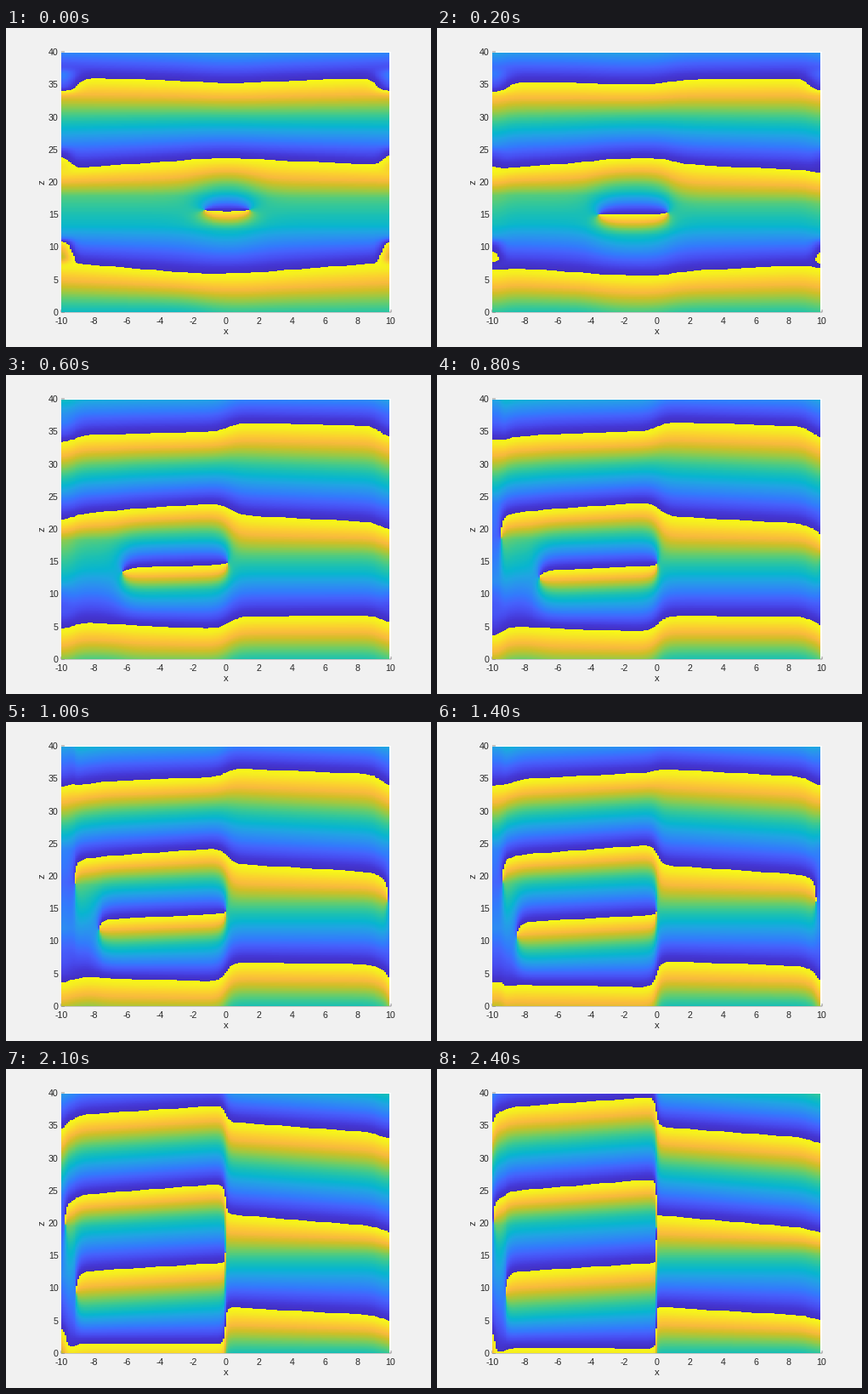
These frames come from a looping animation (500 by 375 pixels, 2.5 s). A matplotlib script:

```python
import numpy as np
import matplotlib.pyplot as plt
from matplotlib.animation import FuncAnimation
from matplotlib.colors import LinearSegmentedColormap

plt.rcParams["font.family"] = "Liberation Sans"
PX = 0.72  # points per pixel at 100 dpi
FRAMES, STEP = 25, 100
INK = "#262626"

PARULA = ("#4230bf #4537d5 #484df0 #4563fd #327cfc #2b91ef #20a5e3 #08b5d0 "
          "#19bfb6 #37c897 #64cd6f #9dc943 #d1bf27 #f8ba3d #fccf30 #f5e924 "
          "#f9fb15").split()
cmap = LinearSegmentedColormap.from_list("parula", PARULA, N=256)

x = -10 + .1 * np.arange(199)
z = .05 + .1 * np.arange(399)[:, None]
side = 10 - np.abs(x)


def wave(points, pivot):
    """Unit wave through (cycles, height, slope along x) points."""
    c, h, _ = points[0]
    c2, h2, s2 = points[-1]
    points = [(c - 1.5, h - 19.8, 0), (c - .5, h - 6.8, 0), *points,
              (c2 + 1, h2 + 13.5, s2)]
    total = points[0][0]
    for (p, a, sa), (q, b, sb) in zip(points, points[1:]):
        low, high = a + sa * (x - pivot), b + sb * (x - pivot)
        total = total + (q - p) * np.clip((z - low) / (high - low), 0, 1)
    return np.exp(2j * np.pi * total)


def outer_wave(t, tilt):
    """Left of the travelling defect: one cycle fewer than inside."""
    s1, s2, s3, s4 = tilt
    return wave([(1, 7.2 - 2.75 * t, s1),
                 (1.45, 13.3 + 1.2 * t, 0),
                 (1.6, 17.8 + .8 * t, 0),
                 (2, 22.4 + .38 * t ** 2, s3),
                 (3, 36 - 3.6 * t + 1.85 * t ** 2, s4)], -8)


def inner_wave(t, tilt):
    """Between the defects; the extra cycle relaxes from a steep step."""
    s1, s2, s3, s4 = tilt
    mid = 13.7 + 1.8 * np.exp(-1.5 * t)
    gap = 3 + 1.5 * t
    return wave([(1, 6 - 2.2 * t, s1),
                 (1.5, mid - gap, s2),
                 (2, mid, s2),
                 (2.5, mid + 1.1 * gap, s2),
                 (3, 23.7 + .5 * t ** 2, s3),
                 (4, 35.2 - 1.2 * t + 1.2 * t ** 2, s4)], -1)


def right_wave(t):
    d = np.exp(-t)
    return wave([(1, 6.8 - .6 * d ** 2, .36 * d - .18),
                 (1.45, 13.4 - .15 * t, 0),
                 (1.6, 15.2 + 2.3 * d ** 2, 0),
                 (2, 22.2 - .6 * t + 1.2 * d ** 4, -.1 - .05 * t),
                 (3, 35.4 + 2 * t - t ** 2, .31 * d - .22)], 2)


def blend(a, b, at, width):
    s = .5 + .5 * np.tanh((x - at) / width)
    return a * (1 - s) + b * s


def wall_shift(t):
    """Phase offset close to both side walls, in cycles."""
    shift = .22 * t * np.exp(-t) * np.exp(-(side / .9) ** 2)
    for height, amount, reach in ((9.4, -.35, .6), (23.5, -.12, .6),
                                  (35.5, .25, .9)):
        spot = np.exp(-((z - height) / 1.8) ** 4 - (side / reach) ** 2)
        shift = shift + amount * np.exp(-3 * t) * spot
    return shift


wall = np.exp(2j * np.pi * np.interp(z, [0, 4.8, 12, 19, 24, 35, 40],
                                     [.65, 1, 1.22, 1.12, 1.2, 2, 2.3]))


def phase(t):
    d = np.exp(-t)
    tilt = np.array([-.2 * d, .18 - .18 * d, .16 + .02 * t, .2 - .28 * d])

    enter = -9.2 - 8 * max(1 - t, 0) ** 2 - .55 * max(t - 1, 0)
    psi = blend(wall, outer_wave(t, tilt), enter, .25)
    psi = blend(psi, inner_wave(t, tilt * np.tanh(3 * t)),
                -9.4 + 8 * np.exp(-1.6 * t), .2 + 1.2 * d)
    psi = blend(psi, right_wave(t), 1.5 * d ** 4 - .1,
                .2 + 1.1 * np.exp(-1.2 * t))
    psi = blend(psi, wall, 9.6 + (t - 1.4) ** 2, .25)
    return np.mod(np.angle(psi) / (2 * np.pi) + wall_shift(t), 1)


fig = plt.figure(figsize=(5, 3.75), dpi=100, facecolor="#f1f1f1")
ax = fig.add_axes([.13, .11, .775, .815])
img = ax.imshow(phase(0), cmap=cmap, vmin=0, vmax=1, origin="lower",
                extent=(-10, 9.9, 0, 39.9), aspect="auto",
                interpolation="nearest", zorder=3)
ax.set(xlim=(-10, 10), ylim=(0, 40))
ax.set_axisbelow(True)
ax.spines[["left", "top", "right"]].set_visible(False)
ax.spines["bottom"].set(linewidth=.3, color=INK, zorder=1)
xt, zt = range(-10, 11, 2), range(0, 41, 5)
ax.set_xticks(xt, [str(v) for v in xt])
ax.set_yticks(zt, [str(v) for v in zt])
ax.tick_params(direction="in", length=3.5 * PX, width=.35, color=INK,
               labelcolor=INK, labelsize=10.6 * PX)
ax.tick_params(axis="x", pad=6 * PX)
ax.tick_params(axis="y", pad=3.5 * PX)
label = dict(ha="center", va="center", fontsize=11.5 * PX, color=INK)
fig.text(259 / 500, 1 - 357.5 / 375, "x", **label)
fig.text(43 / 500, 1 - 181 / 375, "z", rotation=90, **label)


def update(i):
    img.set_data(phase(i * STEP / 1000))
    return [img]


anim = FuncAnimation(fig, update, frames=FRAMES, interval=STEP,
                     repeat=True, repeat_delay=0)
plt.show()
```
